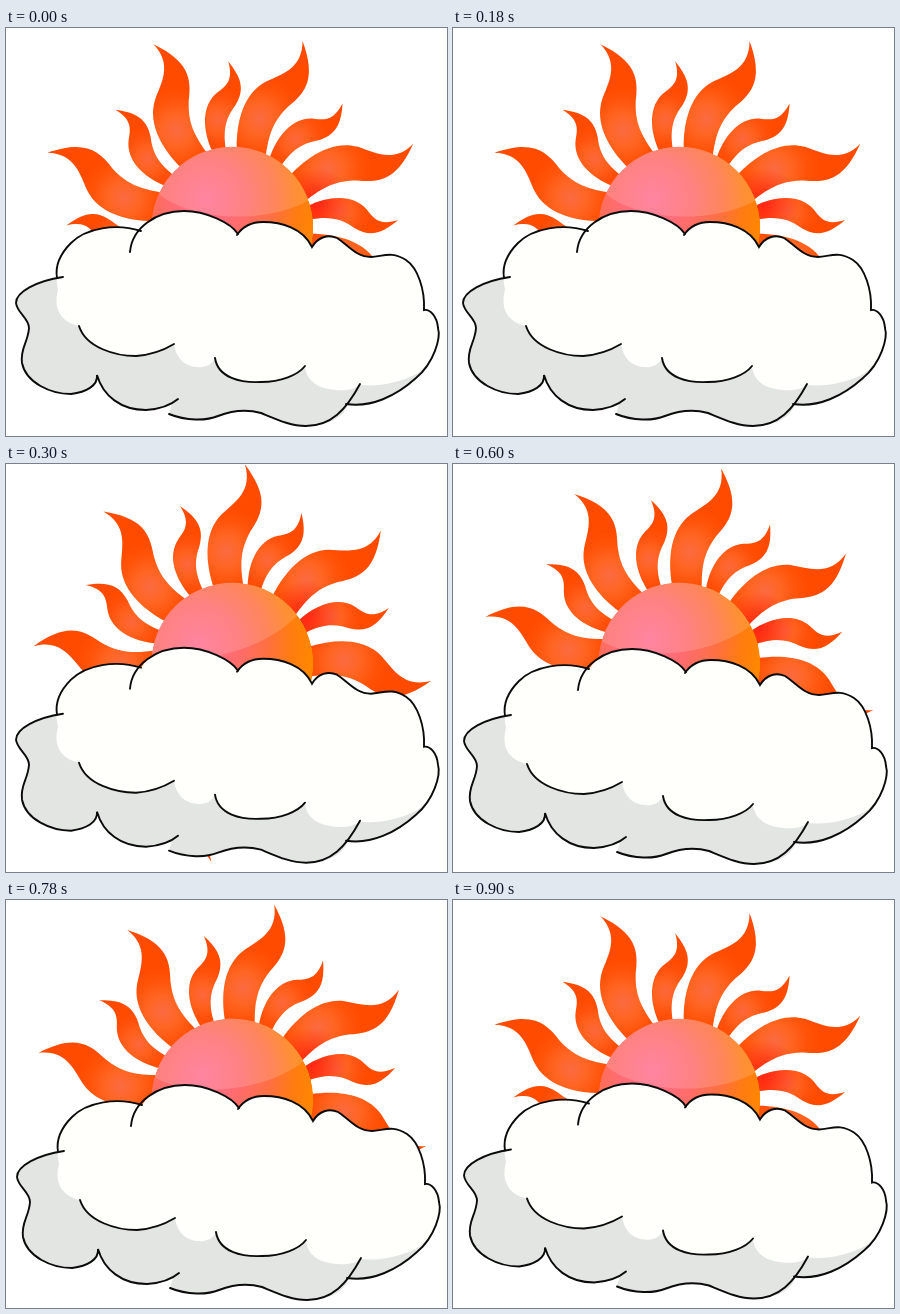
Animation, 441 px wide and 408 px high, one loop 1.2 s. Source, as an HTML page:

```html
<!DOCTYPE html>
<html>
<head>
<meta charset="utf-8">
<style>
  html, body { margin: 0; width: 100%; height: 100%; overflow: hidden; background: #fff; }
  svg { display: block; width: 100%; height: 100%; }
</style>
</head>
<body>
<svg viewBox="0 0 441 408">
  <defs>
    <radialGradient id="bigFill" gradientUnits="userSpaceOnUse" cx="-5" cy="-112" r="44">
      <stop offset="0" stop-color="#fb6a42"/>
      <stop offset=".35" stop-color="#ff6624"/>
      <stop offset=".7" stop-color="#ff540a"/>
      <stop offset="1" stop-color="#ff4b00"/>
    </radialGradient>
    <radialGradient id="smallFill" gradientUnits="userSpaceOnUse" cx="-14" cy="-108" r="32">
      <stop offset="0" stop-color="#fc683c"/>
      <stop offset=".35" stop-color="#ff6220"/>
      <stop offset=".75" stop-color="#ff500a"/>
      <stop offset="1" stop-color="#ff4b00"/>
    </radialGradient>
    <radialGradient id="discFill" gradientUnits="userSpaceOnUse" cx="-26" cy="-28" r="115">
      <stop offset="0" stop-color="#ff6e90"/>
      <stop offset=".35" stop-color="#fe6c6c"/>
      <stop offset=".6" stop-color="#fe7040"/>
      <stop offset=".8" stop-color="#ff7c10"/>
      <stop offset="1" stop-color="#ff8800"/>
    </radialGradient>
    <radialGradient id="glowFill">
      <stop offset="0" stop-color="#ff1c18" stop-opacity=".8"/>
      <stop offset="1" stop-color="#ff1c18" stop-opacity="0"/>
    </radialGradient>
    <clipPath id="discClip"><circle r="81"/></clipPath>
    <clipPath id="rayClip"></clipPath>
    <path id="big" fill="url(#bigFill)" d="M14-199C22-172 3-161-10-149C-27-132-27-104-18-76L12-76C8-100 9-114 19-132C33-152 37-168 14-199Z"/>
    <path id="small" fill="url(#smallFill)" d="M-4-166C1-148-5-142-15-135C-31-122-30-98-20-76L-6-76C-10-98-6-110 3-122C13-138 9-150-4-166Z"/>
  </defs>

  <g id="sun">
    <g id="rays"></g>
    <circle cx="84" cy="-24" r="36" fill="url(#glowFill)" clip-path="url(#rayClip)"/>
    <g clip-path="url(#discClip)">
      <circle r="81" fill="url(#discFill)"/>
      <ellipse cx="6" cy="-57" rx="92" ry="46" fill="#fff" opacity=".15"/>
    </g>
  </g>

  <g id="cloud">
    <path fill="#e3e5e3" d="M57 249C30 253 10 264 10 275C11 285 23 290 23 300C22 315 14 320 16 335C20 355 45 366 65 366C80 364 92 358 91 347C97 368 115 382 140 382C152 382 160 378 166 376L163 386C180 393 200 393 212 388C225 383 240 381 255 385C272 392 285 398 300 398C325 398 338 388 342 376C365 380 390 368 410 350C428 335 435 310 432 300C431 288 424 281 418 282Z"/>
    <path fill="#fffffc" d="M52 262C48 243 52 228 65 215C80 200 110 195 135 203C143 190 158 183 178 183C200 183 225 195 232 206C237 198 245 194 257 194C275 194 297 200 306 219C312 209 322 206 331 210C342 217 350 229 365 229C378 228 386 223 400 232C412 240 419 262 418 282C426 282 432 291 432 304C431 322 425 335 412 345C394 355 372 359 354 357C347 362 337 363 330 362C314 361 300 354 299 338C292 347 275 354 255 354C235 355 212 350 209 330C206 337 198 340 192 339C180 339 170 331 168 316C158 322 145 327 130 328C110 328 80 320 73 298C54 294 47 280 52 262Z"/>
    <g fill="none" stroke="#0b0b0b" stroke-width="1.9" stroke-linecap="round">
      <path d="M57 249C30 253 10 264 10 275C11 285 23 290 23 300C22 315 14 320 16 335C20 355 45 366 65 366C80 364 92 358 91 347C97 368 115 382 140 382C155 381 165 377 172 371"/>
      <path d="M163 386C180 393 200 393 212 388C225 383 240 381 255 385C272 392 285 398 300 398C325 398 340 382 354 356"/>
      <path d="M340 376C365 380 390 368 410 350C428 335 435 310 432 300C431 288 424 281 418 282C419 262 412 240 400 232C386 223 378 228 365 229C350 229 342 217 331 210C322 206 312 209 306 219C297 200 275 194 257 194C245 194 237 198 231 207"/>
      <path d="M232 206C225 195 200 183 178 183C150 183 126 200 124 224"/>
      <path d="M135 203C110 195 80 200 65 215C53 227 49 238 51 250"/>
      <path d="M73 298C80 320 110 328 130 328C145 327 158 322 168 316"/>
      <path d="M209 330C212 350 235 355 255 354C275 354 292 347 299 338"/>
    </g>
  </g>
</svg>
<script>
  const byId = id => document.getElementById(id);

  // Each shape leans by its own angle; the lists give the tip directions.
  const addRays = (shape, lean, angles) => {
    const uses = angles.map(angle =>
      `<use href="#${shape}" transform="rotate(${angle - lean})"/>`).join('');
    byId('rays').innerHTML += uses;
    byId('rayClip').innerHTML += uses;
  };
  addRays('big', 4, [-68, -23.3, 20.6, 65.1, 111.9, 203]);
  addRays('small', -1.4, [-89.3, -44.8, -1.4, 41.6, 87.4]);

  // Sun turn in degrees, cloud shift in pixels
  const poses = [[0, 0, 0], [-17, 0, .7], [-8.5, 1, 2], [0, 1, .5]];

  function draw() {
    const [turn, x, y] = poses[Math.floor(performance.now() % 1200 / 300)];
    byId('sun').setAttribute('transform', `translate(226.3 199.6) rotate(${turn})`);
    byId('cloud').setAttribute('transform', `translate(${x} ${y})`);
    requestAnimationFrame(draw);
  }
  draw();
</script>
</body>
</html>
```
